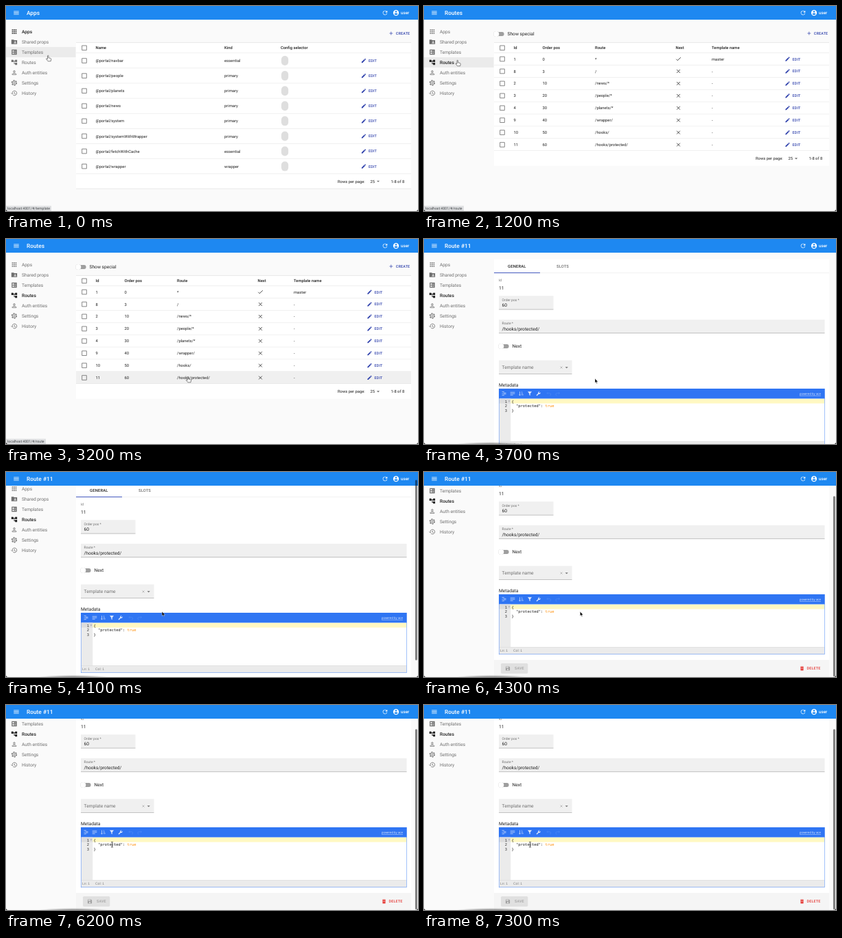
Recreate the animation shown at these times as an HTML page. Size 600 px wide and 300 px high, loop 7.6 s.

```html
<!DOCTYPE html>
<html lang="en">
<head>
<meta charset="utf-8">
<title>Admin panel</title>
<style>
  html, body { margin: 0; width: 100%; height: 100%; overflow: hidden; background: #fafafa; }
  svg { display: block; width: 100%; height: 100%; }
  text { font-family: Roboto, Arial, sans-serif; text-rendering: geometricPrecision; white-space: pre; }
  .mono { font-family: "DejaVu Sans Mono", monospace; }
  .arial { font-family: "Liberation Sans", Arial, sans-serif; }
  .card { fill: #fff; filter: drop-shadow(0 .4px .6px rgba(0,0,0,.32)); }
</style>
</head>
<body>
<svg id="stage" viewBox="0 0 600 300" xmlns="http://www.w3.org/2000/svg"></svg>
<script>
const LOOP = 7600, STEP = 100;
const INK = '#212121', MUTED = '#6f6f6f', LINK = '#3042ac', RED = '#e53935', LINE = '#dedede';

// Icons on a 24-unit grid: filled paths, or stroked ones in LINES.
const FILLS = {
  menu: 'M3 6h18v2H3zM3 11h18v2H3zM3 16h18v2H3z',
  refresh: 'M17.65 6.35A8 8 0 1 0 19.73 14h-2.08A6 6 0 1 1 16.22 7.78L13 11h7V4z',
  account: 'M12 2a10 10 0 1 0 0 20 10 10 0 0 0 0-20zm0 3a3 3 0 1 1 0 6 3 3 0 0 1 0-6zm0 14.2c-2.5 0-4.7-1.3-6-3.2 0-2 4-3.1 6-3.1s6 1.1 6 3.1c-1.3 1.9-3.5 3.2-6 3.2z',
  apps: [4, 10, 16].map(x => [4, 10, 16].map(y => `M${x} ${y}h4v4h-4z`).join('')).join(''),
  shared: 'M2 4h8l2 2h10v14H2zM15 9a2 2 0 1 0 0 4 2 2 0 0 0 0-4zM11 17h8v-1c0-2.6-8-2.6-8 0z',
  templates: 'M3 3h18v18H3zM6 6v5h5V6zM6 13v5h5v-5zM13 7.5v2h5v-2zM13 14.5v2h5v-2z',
  routes: 'M22 11V3h-7v3H9V3H2v8h7V8h2v10h4v3h7v-8h-7v3h-2V8h2v3z',
  edit: 'M3 17.25V21h3.75L17.81 9.94l-3.75-3.75zM20.7 7a1 1 0 0 0 0-1.4l-2.3-2.3a1 1 0 0 0-1.4 0l-1.9 1.8 3.8 3.8z',
  drop: 'M7 10l5 5 5-5z',
  trash: 'M6 19c0 1.1.9 2 2 2h8c1.1 0 2-.9 2-2V7H6zM19 4h-3.5l-1-1h-5l-1 1H5v2h14zM9 10l6 6-1.2 1.2-6-6zM15 10l1.2 1.2-6 6L9 16z',
  save: 'M17 3H5a2 2 0 0 0-2 2v14c0 1.1.9 2 2 2h14c1.1 0 2-.9 2-2V7zM12 13a3 3 0 1 0 0 6 3 3 0 0 0 0-6zM5 5v4h10V5z',
  funnel: 'M3 3h18l-7 9v9l-4-3v-6z',
  wrench: 'M21 6l-4 4-3-3 4-4a6 6 0 0 0-7 8L3 18.500l3 3L13.500 14A6 6 0 0 0 21 6z'
};
const LINES = {
  person: 'M12 5a3 3 0 1 0 0 6 3 3 0 0 0 0-6zM5 19v-2c0-4 14-4 14 0v2z',
  history: 'M5 12a8 8 0 1 1 2.5 5.800M1.500 12L5 15.500 8.500 12M13 8v5l4 2.400',
  check: 'M4 12.500l5 5L20.500 6',
  close: 'M6 6l12 12M18 6L6 18',
  add: 'M12 5v14M5 12h14',
  box: 'M4 4h16v16H4z',
  indent: 'M3 4h10M9 9h12M9 14h12M3 19h10M3 12h4',
  lines: 'M2 6h20M2 12h20M2 18h12',
  sort: 'M6 3v17M2 16l4 4 4-4M13 5h4M13 11h6M13 17h9',
  undo: 'M4 10h11a5 5 0 0 1 0 10M8 5l-5 5 5 5',
  redo: 'M20 10H9a5 5 0 0 0 0 10M16 5l5 5-5 5'
};

const text = (x, y, s, size = 5.83, fill = INK, more = '') =>
  `<text x="${x}" y="${y + size * .36}" font-size="${size}" fill="${fill}" ${more}>${s}</text>`;
const bold = (x, y, s, size, fill) => text(x, y, s, size, fill, 'font-weight="500"');
const rect = (x, y, w, h, fill, more = '') =>
  `<rect x="${x}" y="${y}" width="${w}" height="${h}" fill="${fill}" ${more}/>`;
const group = (id, s) => `<g id="${id}">${s}</g>`;

function icon(name, x, y, color = INK, size = 10) {
  const k = size / 24;
  const at = `transform="translate(${x - size / 2} ${y - size / 2}) scale(${k})"`;
  if (name === 'gear')
    return `<g ${at} fill="none" stroke="${color}"><circle cx="12" cy="12" r="6.8" stroke-width="2"/>
      <circle cx="12" cy="12" r="8.700" stroke-width="2.600" stroke-dasharray="4.555"/>
      <circle cx="12" cy="12" r="2.800" stroke-width="1.700"/></g>`;
  return LINES[name]
    ? `<path ${at} d="${LINES[name]}" fill="none" stroke="${color}" stroke-width="2"/>`
    : `<path ${at} d="${FILLS[name]}" fill="${color}" fill-rule="evenodd"/>`;
}

const button = (name, x, y, label, color) =>
  icon(name, x, y, color, 8.33) +
  text(x + 7, y, label, 5.42, color, 'font-weight="500" letter-spacing=".155"');

const toggle = (x, y, label) =>
  rect(x + 5, y - 2.9, 14.2, 5.8, '#9e9e9e', 'rx="2.900"') +
  `<circle class="card" cx="${x + 7.9}" cy="${y}" r="4.100"/>` +
  text(x + 24.1, y, label, 6.67);

// A list table: cols = [x, title], rows = cell values; a value may be raw markup.
function table({ top, pitch, bottom, cols, rows, editX, id }) {
  let s = rect(102, 53.5, 488, bottom - 53.5, '#fff', 'class="card"');
  s += icon('box', 114, 61.3, MUTED) + cols.map(([x, t]) => bold(x, 61.3, t)).join('');
  s += rect(102, top - .4, 488, .45, LINE);
  rows.forEach((row, i) => {
    const y = top + pitch * (i + .5);
    s += rect(102, y - pitch / 2, 488, pitch, '#f0f0f0', `id="${id}${i}" visibility="hidden"`);
    s += icon('box', 114, y, MUTED);
    row.forEach((cell, j) => s += typeof cell === 'function' ? cell(y) : text(cols[j][0], y, cell));
    s += button('edit', editX, y, 'EDIT', LINK);
    s += rect(102, y + pitch / 2 - .4, 488, .45, LINE);
  });
  const foot = bottom - 10.8;
  return s + text(483, foot, 'Rows per page:') + text(530.5, foot, '25') +
    icon('drop', 542, foot, MUTED) + text(560.5, foot, '1-8 of 8') +
    button('add', 560.8, 40, 'CREATE', LINK);
}

const pill = y => rect(401, y - 7, 10.2, 14, '#dedede', 'rx="5"');
const mark = name => y => icon(name, 370.5, y, INK, 9.5);

const appsPage = table({
  id: 'app', top: 69, pitch: 22.08, bottom: 267.3, editX: 521,
  cols: [[130.5, 'Name'], [318, 'Kind'], [400, 'Config selector']],
  rows: [['navbar', 'essential'], ['people', 'primary'], ['planets', 'primary'], ['news', 'primary'],
    ['system', 'primary'], ['systemWithWrapper', 'primary'], ['fetchWithCache', 'essential'],
    ['wrapper', 'wrapper']].map(([n, k]) => ['@portal/' + n, k, pill])
});

const routesPage = toggle(97.4, 41, 'Show special') + table({
  id: 'route', top: 68.6, pitch: 17.92, bottom: 234, editX: 529.5,
  cols: [[130.5, 'Id'], [172.5, 'Order pos'], [249, 'Route'], [366.5, 'Next'], [419, 'Template name']],
  rows: [[1, 0, '*'], [8, 3, '/'], [2, 10, '/news/*'], [3, 20, '/people/*'], [4, 30, '/planets/*'],
    [9, 40, '/wrapper/'], [10, 50, '/hooks/'], [11, 60, '/hooks/protected/']]
    .map((r, i) => [...r, mark(i ? 'close' : 'check'), i ? '-' : 'master'])
});

const field = (y, w, label, value) =>
  rect(109, y, w, 20, '#f0f0f0') + rect(109, y + 19.6, w, .5, '#8c8c8c') +
  (label ? text(113.6, y + 5.6, label, 5, MUTED) + text(113.6, y + 13.8, value, 6.67)
         : text(113.6, y + 10.3, value, 6.67, MUTED));

function editor(y) {
  const blue = '#2f75f3', pale = 'rgba(255,255,255,.85)', dim = 'rgba(255,255,255,.14)';
  const code = (x, n, s, fill = '#1a1a1a', more = '') =>
    text(x, y + 18.6 + 6.75 * n, s, 5.42, fill, 'class="mono" ' + more);
  let s = rect(109, y, 474.5, 88, '#fff') + rect(109, y, 474.5, 14.6, blue);
  ['indent', 'lines', 'sort', 'funnel', 'wrench', 'undo', 'redo'].forEach((n, i) =>
    s += icon(n, 116.5 + 12.5 * i + (i > 4 ? 3 : 0), y + 7.3, i > 4 ? dim : pale, 8));
  s += text(547, y + 7.6, 'powered by ace', 4.4, pale, 'class="arial" text-decoration="underline"');
  s += rect(109.4, y + 14.6, 16.8, 62.6, '#ebebeb') + rect(109.4, y + 14.9, 16.8, 6.7, '#dcdcdc');
  s += rect(126.2, y + 14.9, 457, 6.7, '#fff8c2');
  ['{', '  "protected": <tspan fill="#ff8c00">true</tspan>', '}'].forEach((c, i) =>
    s += code(121, i, i + 1, '#333', 'text-anchor="end"') + code(127.6, i, c));
  s += icon('drop', 124, y + 18.2, '#666', 5);
  s += rect(109.4, y + 77.2, 473.8, 10.6, '#ebebeb') + rect(109.4, y + 77, 473.8, .45, '#d0d0d0');
  s += text(111, y + 82.6, 'Ln: 1', 5, '#808080', 'class="arial"') +
       text(130, y + 82.6, 'Col: 1', 5, '#808080', 'class="arial"');
  return s + rect(109.2, y + .2, 474.1, 87.6, 'none', `stroke="${blue}" stroke-width=".45"`);
}

const detailPage =
  rect(102, 30, 488, 312, '#fff', 'class="card"') +
  text(135.3, 40, 'GENERAL', 5.83, INK, 'font-weight="500" text-anchor="middle" letter-spacing=".16"') +
  text(202, 40, 'SLOTS', 5.83, MUTED, 'font-weight="500" text-anchor="middle" letter-spacing=".16"') +
  rect(102, 49.6, 488, .45, LINE) + rect(102, 49, 67, .9, '#3048b8') +
  text(109, 60, 'Id', 5, MUTED) + text(109, 71.2, '11', 6.67) +
  field(83.2, 79.5, 'Order pos *', '60') +
  field(118, 474.5, 'Route *', '/hooks/protected/') +
  toggle(104.4, 157, 'Next') +
  field(177.5, 106.5, '', 'Template name') +
  icon('close', 200, 188, '#8a8a8a', 6) + icon('drop', 207.7, 188, MUTED) +
  text(109, 213.6, 'Metadata', 6.67) + editor(219) +
  rect(102, 315, 488, 27, '#f5f5f5') + rect(112, 320, 39.3, 15, '#e0e0e0', 'rx="1.700"') +
  icon('save', 122, 327.5, '#a3a3a3', 8.33) +
  text(132, 327.5, 'SAVE', 5.42, '#a3a3a3', 'font-weight="500" letter-spacing=".155"') +
  button('trash', 550.5, 327.5, 'DELETE', RED);

const MENU = [['apps', 'Apps'], ['shared', 'Shared props'], ['templates', 'Templates'], ['routes', 'Routes'],
  ['person', 'Auth entities'], ['gear', 'Settings'], ['history', 'History']];
const menuY = i => 37.5 + 15 * i;
const menuItem = (i, active) => {
  const [name, label] = MENU[i], color = active ? INK : MUTED;
  return icon(name, 12, menuY(i), color) +
    (active ? bold : text)(23, menuY(i), label, 6.67, color);
};

const CURSORS = {
  hand: '<path d="M0 .8q.8-1.300 1.400 0v3l3 .7q1 .4.800 1.600l-.5 2.700H.6L-1.900 5.600q-.1-1 .8-.7L0 5.700z" fill="#fff" stroke="#222" stroke-width=".55"/>',
  arrow: '<path d="M0 0v6.200l1.400-1.300 1 2.200 1-.4-1-2.100h1.900z" fill="#000" stroke="#fff" stroke-width=".4"/>',
  beam: '<path d="M-1.300-4Q0-4 0-3V3Q0 4-1.300 4M1.300-4Q0-4 0-3M0 3Q0 4 1.300 4" fill="none" stroke="#111" stroke-width=".7"/>'
};

const stage = document.getElementById('stage');
stage.innerHTML =
  `<defs><radialGradient id="shade"><stop offset="0" stop-color="#000" stop-opacity=".6"/>
   <stop offset="1" stop-color="#000" stop-opacity="0"/></radialGradient></defs>` +
  rect(0, 0, 600, 300, '#fafafa') +
  group('body', rect(0, 60, 101.5, 15, '#ebebeb', 'id="menuHover"') + group('menu', '') +
    group('apps', appsPage) + group('routes', routesPage) + group('detail', detailPage)) +
  rect(0, 0, 600, 20, '#1e88f1', 'style="filter:drop-shadow(0 .4px .6px rgba(0,0,0,.25))"') +
  icon('menu', 15, 10, '#fff') +
  '<text id="title" x="30" y="13" font-size="8.33" font-weight="500" fill="#fff"></text>' +
  icon('refresh', 552, 10, '#fff') + icon('account', 568, 10, '#fff') + bold(575, 10, 'user', 6.25, '#fff') +
  group('bubble', '<rect id="bubbleBox" y="292.500" height="7.500" fill="#dedfe1"/>' +
    '<text id="url" x="2" y="298.200" font-size="5.200" fill="#3c4043"></text>') +
  group('bar', rect(595.9, 0, 3, 264, '#000', 'rx="1.500" opacity=".5"') +
    '<ellipse cx="0" cy="0" rx="0" ry="0"/>') +
  '<ellipse id="glow" cx="98" cy="301" rx="54" ry="4" fill="url(#shade)"/>' +
  '<path d="M0 297v3h3q-3 0-3-3zM600 297v3h-3q3 0 3-3z" fill="#111"/>' +
  Object.keys(CURSORS).map(k => group(k, CURSORS[k])).join('');

const el = id => document.getElementById(id);
const show = (id, on) => el(id).setAttribute('visibility', on ? 'visible' : 'hidden');

// [time, x, y] of the pointer tip; [time, offset] of the page scroll.
const PATH = [[0, 60.5, 72], [100, 60, 73], [500, 48, 79], [1300, 48, 79], [2400, 262, 188], [2600, 262, 197],
  [2800, 264.3, 201], [3400, 264.3, 201], [3700, 249, 204.3], [3800, 227, 204.3], [4600, 227.5, 204.3], [5400, 154.5, 204.3]];
const SCROLL = [[3900, 0], [4000, 4], [4100, 13], [4200, 28], [4300, 40]];

function sample(keys, t) {
  if (t <= keys[0][0]) return keys[0].slice(1);
  for (let i = 1; i < keys.length; i++) {
    const [a, b] = [keys[i - 1], keys[i]];
    if (t > b[0]) continue;
    const u = (t - a[0]) / (b[0] - a[0]);
    const e = b[0] - a[0] > 200 ? u * u * (3 - 2 * u) : u;
    return a.slice(1).map((v, j) => v + (b[j + 1] - v) * e);
  }
  return keys[keys.length - 1].slice(1);
}

let activeItem = -1;
function draw(time) {
  const t = Math.floor(time / STEP) * STEP;
  const page = t < 700 ? 'apps' : t < 3500 ? 'routes' : 'detail';
  const [x, y] = sample(PATH, t), [scroll] = sample(SCROLL, t);
  const detail = page === 'detail';

  ['apps', 'routes', 'detail'].forEach(p => el(p).style.display = p === page ? '' : 'none');
  el('title').textContent = { apps: 'Apps', routes: 'Routes', detail: 'Route #11' }[page];
  el('body').setAttribute('transform', `translate(0 ${-scroll})`);

  const active = page === 'apps' ? 0 : 3;
  if (active !== activeItem) {
    activeItem = active;
    el('menu').innerHTML = MENU.map((m, i) => menuItem(i, i === active)).join('');
  }

  const item = x < 101.5 ? Math.floor((y - 30) / 15) : -1;
  show('menuHover', item >= 0);
  el('menuHover').setAttribute('y', menuY(Math.max(item, 0)) - 7.5);
  const row = page === 'routes' && x > 102 ? Math.floor((y - 68.6) / 17.92) : -1;
  for (let i = 0; i < 8; i++) el('route' + i).setAttribute('visibility', i === row ? 'inherit' : 'hidden');

  const onTemplates = item === 2 && page === 'apps';
  show('bubble', !detail);
  el('url').textContent = 'localhost:4001/#/' + (onTemplates ? 'template' : 'route');
  el('bubbleBox').setAttribute('width', onTemplates ? 66 : 58);
  show('glow', detail);
  show('bar', t >= 4000);
  el('bar').setAttribute('transform', `translate(0 ${scroll * .88})`);

  const kind = detail ? (t >= 4500 ? 'beam' : 'arrow') : item >= 0 || row >= 0 ? 'hand' : 'arrow';
  Object.keys(CURSORS).forEach(k => show(k, k === kind));
  el(kind).setAttribute('transform', `translate(${x} ${y})`);
}

const start = performance.now();
function tick() {
  draw((performance.now() - start) % LOOP);
  requestAnimationFrame(tick);
}
tick();
</script>
</body>
</html>
```
